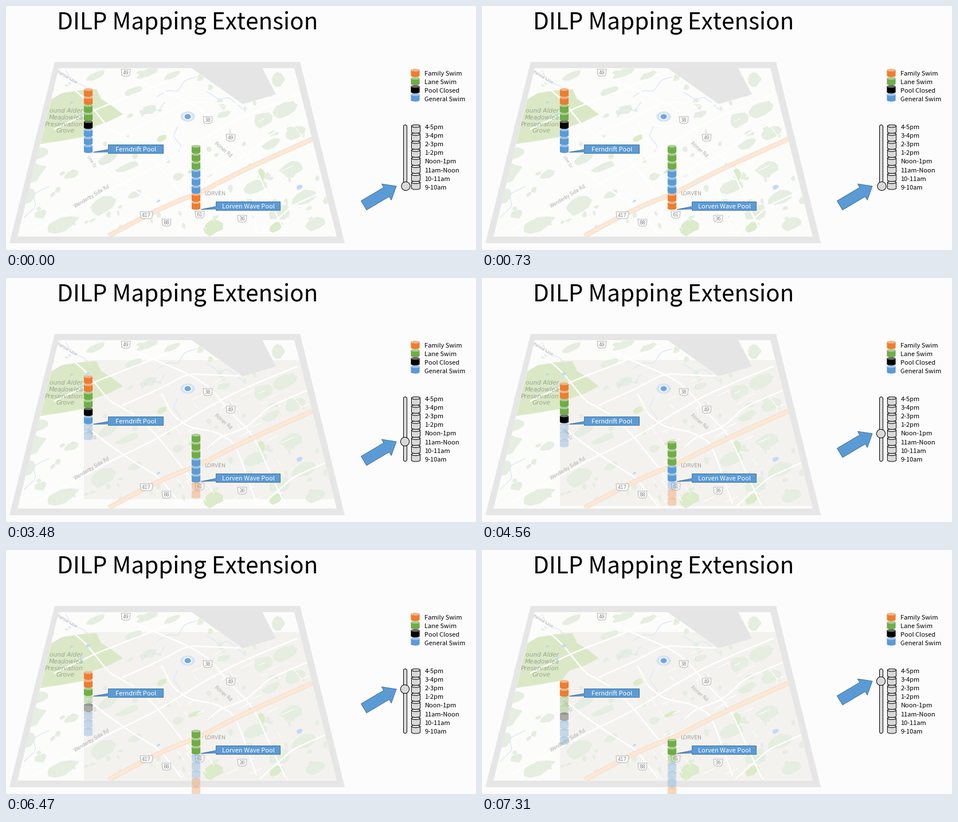
These frames come from a looping animation (820x428 px, 8000 ms). A matplotlib script:

```python
import numpy as np
import matplotlib.pyplot as plt
from matplotlib.animation import FuncAnimation
from matplotlib.collections import LineCollection, PolyCollection
from matplotlib.colors import to_rgb
from matplotlib.patches import Circle, Ellipse, FancyBboxPatch, Polygon

W, H, DPI = 820, 428, 64
STEP, LOOP = 40, 8000
SANS, MAP_FONT = "Noto Sans CJK JP", "DejaVu Sans"
ORANGE, GREEN, BLACK, BLUE = "#ed7d31", "#70ad47", "#000000", "#5b9bd5"
EDGE, GREY = "#41719c", "#d9d9d9"

CHANGES = (2290, 3480, 4560, 5400, 6470, 7310)
STACK_DROP = (0, 14, 29.5, 42, 56, 71.5, 87)
KNOB_Y = (316, 302, 287, 273, 258.5, 244, 230)
TINT_END = (144, 372, 388, 400, 404, 404, 404)

fig = plt.figure(figsize=(W / DPI, H / DPI), dpi=DPI, facecolor="#fcfcfc")
ax = fig.add_axes([0, 0, 1, 1])
ax.set_xlim(0, W)
ax.set_ylim(H, 0)
ax.axis("off")
rng = np.random.default_rng(7)


def px(size):
    return size * 72 / DPI


def add_poly(points, color, z, edge="none", lw=0.0):
    return ax.add_patch(Polygon(points, fc=color, ec=edge, lw=px(lw), zorder=z))


def write(x, y, text, size, color="black", z=6, font=SANS, **kw):
    return ax.text(x, y, text, fontsize=px(size), color=color, zorder=z,
                   family=font, **kw)


def lighter(color, amount=0.42):
    c = np.array(to_rgb(color))
    return tuple(c + (1 - c) * amount)


# --- map -------------------------------------------------------------------
add_poly([(85, 98), (513, 98), (591, 416), (6, 416)], "#e6e6e6", 1)
INNER = [(92, 109), (503, 109), (577, 404.5), (20, 404.5)]
board = add_poly(INNER, "#fcfcfb", 1.1)
tint = add_poly([(136, 144)] * 4, "#f4f2ef", 1.2)


def on_map(artist):
    ax.add_artist(artist)
    artist.set_clip_path(board)
    return artist


def blob(cx, cy, w, h, n=9):
    """Ragged patch leaning along the street grid."""
    a = np.linspace(0, 2 * np.pi, n, endpoint=False)
    r = rng.uniform(0.72, 1.12, n)
    x, y = w / 2 * r * np.cos(a), h / 2 * r * np.sin(a)
    return np.column_stack([cx + x + 0.25 * y, cy + y - 0.4 * x])


def smooth(points, n=40):
    """Rounded path through a few points."""
    p = np.array(points, float)
    t = np.arange(len(p))
    s = np.linspace(0, t[-1], n)
    xy = np.column_stack([np.interp(s, t, p[:, k]) for k in (0, 1)])
    pad = np.pad(xy, ((2, 2), (0, 0)), mode="edge")
    return sum(pad[k:k + n] for k in range(5)) / 5


woods = [
    (45, 292, 46, 34), (60, 258, 34, 18), (38, 335, 30, 26), (95, 384, 62, 30),
    (168, 350, 46, 32), (176, 268, 40, 16), (212, 282, 42, 14),
    (158, 122, 36, 12), (246, 118, 40, 14), (290, 122, 28, 12),
    (222, 150, 32, 14), (250, 182, 30, 16), (380, 190, 24, 12),
    (448, 200, 36, 28), (486, 182, 44, 24), (505, 222, 40, 22),
    (462, 242, 32, 16), (474, 128, 22, 28), (435, 318, 44, 22),
    (498, 285, 42, 26), (520, 335, 46, 24), (478, 362, 38, 28),
    (540, 382, 40, 22), (300, 300, 20, 14), (226, 330, 26, 12),
    (420, 345, 26, 14), (60, 365, 26, 16), (115, 295, 30, 14)]
specks = [(rng.uniform(40, 560), rng.uniform(115, 400), *rng.uniform(4, 13, 2))
          for _ in range(80)]
on_map(PolyCollection([blob(*w) for w in woods + specks],
                      facecolors="#e5eee0", edgecolors="none", zorder=1.3))
bright = [(362, 388, 34, 26), (470, 388, 28, 16), (272, 232, 18, 12),
          (330, 288, 30, 8), (445, 296, 14, 22)]
on_map(PolyCollection([blob(*b) for b in bright],
                      facecolors="#dcebca", edgecolors="none", zorder=1.3))
forest = [(60, 242), (70, 200), (79, 164), (97, 153), (128, 148), (158, 146),
          (166, 163), (186, 176), (204, 190), (178, 203), (152, 212),
          (139, 229), (100, 236)]
on_map(Polygon(forest, fc="#dbe8c6", ec="none", zorder=1.35))
on_map(Polygon([(324, 109), (447, 109), (471, 155), (413, 172)],
               fc="#e5e5e5", ec="none", zorder=1.35))

roads = [
    [(80, 218), (160, 180), (250, 145), (330, 112)],
    [(190, 109), (250, 140), (318, 168), (354, 190), (394, 238), (432, 276),
     (460, 340), (490, 404)],
    [(136, 256), (170, 285), (222, 322), (268, 350), (310, 404)],
    [(40, 400), (120, 356), (185, 320), (262, 283), (330, 240), (400, 200),
     (520, 150)],
    [(270, 200), (290, 240), (320, 262), (366, 270), (400, 290), (440, 404)],
    [(200, 225), (260, 198), (318, 168), (413, 172)],
    [(225, 240), (262, 275), (290, 310), (338, 370)],
    [(440, 404), (500, 350), (566, 320)],
    [(350, 300), (372, 280), (420, 262), (460, 225), (530, 195)],
    [(100, 130), (140, 165), (180, 215), (225, 240)]]
on_map(LineCollection([smooth(r) for r in roads], colors="#ffffff",
                      linewidths=px(2.6), zorder=1.5))
lanes = []
for _ in range(45):
    x, y, d = rng.uniform(230, 520), rng.uniform(180, 395), rng.uniform(8, 24)
    sx, sy = (1, -0.48) if rng.random() < 0.5 else (0.6, 0.8)
    lanes.append([(x, y), (x + d * sx, y + d * sy)])
on_map(LineCollection(lanes, colors="#ffffff", linewidths=px(1.2), zorder=1.45))
streams = [
    [(104, 112), (114, 132), (136, 140), (152, 158)],
    [(262, 160), (282, 148), (300, 150), (312, 130), (334, 124)],
    [(236, 196), (248, 178), (266, 184), (278, 168)],
    [(350, 150), (372, 164), (388, 160), (420, 186)],
    [(300, 210), (292, 228), (306, 246), (298, 262)],
    [(30, 372), (52, 352), (48, 330), (76, 316)]]
on_map(LineCollection([smooth(s) for s in streams], colors="#d9e8f8",
                      linewidths=px(1.3), zorder=1.45))
ponds = [(131, 191, 8, 5), (143, 168, 8, 6), (114, 169, 7, 4),
         (512, 318, 13, 8), (266, 342, 7, 4), (96, 200, 5, 3)]
on_map(PolyCollection([blob(*p) for p in ponds], facecolors="#c0daf6",
                      edgecolors="none", zorder=1.5))
highway = smooth([(172, 407), (238, 371), (292, 345), (342, 326), (384, 303),
                  (440, 276), (500, 249), (540, 231)])
for color, width in (("#f8dfc8", 8.5), ("#fce8d6", 6)):
    on_map(LineCollection([highway], colors=color, linewidths=px(width),
                          zorder=1.6))

for x, y, text in ((76, 187, "ound Alder"), (75, 199, "Meadowlea"),
                   (68, 211, "Preservation"), (88, 222, "Grove")):
    write(x, y, text, 10.6, "#98a78e", 1.8, MAP_FONT, style="italic")
for x, y, text, angle, size in (
        (150, 334, "Wenderby Side Rd", 31, 7.6), (379, 252, "Pilmer Rd", -40, 7.6),
        (107, 125, "Fallow Line", -30, 7), (149, 273, "Ulm Cr", -58, 7)):
    write(x, y, text, size, "#adadad", 1.8, MAP_FONT, rotation=angle,
          ha="center", va="center")
write(346, 332, "LORVEN", 9.2, "#a3a3a3", 1.8, MAP_FONT)

for x, y, text in ((209, 117, "49"), (352, 200, "38"), (392, 231, "49"),
                   (245, 367, "417"), (338, 366, "61"), (280, 380, "88"),
                   (412, 373, "36")):
    w = 11 if len(text) == 3 else 8
    add_poly([(x - w, y - 6), (x + w, y - 6), (x + w - 1, y + 4), (x + w - 4, y + 6),
              (x - w + 4, y + 6), (x - w + 1, y + 4)], "#fbfbfb", 1.8, "#b5b5b5", 1)
    write(x, y + 3.2, text, 8.4, "#8c8c8c", 1.9, MAP_FONT, ha="center")

for w, h, color in ((25, 18, "#d3e3f8"), (16, 13, "#f6faff"), (11, 9, "#6fa5ea")):
    ax.add_patch(Ellipse((317, 194), w, h, fc=color, ec="none", zorder=1.9))


# --- cylinders -------------------------------------------------------------
class Can:
    def __init__(self, x, y, color, z, rx=7.6, h=13, edge="none", lid=None):
        a = np.linspace(0, np.pi, 16)
        curve = np.column_stack([rx * np.cos(a), 2.2 * np.sin(a)])
        self.body_shape = np.vstack([curve * (1, -1) + (0, 2.2),
                                     curve[::-1] + (0, h - 0.5)])
        full = np.vstack([curve, -curve])
        self.lid_shape = full + (0, 2.2)
        lw = 1 if edge != "none" else 0
        self.body = add_poly(self.body_shape, color, z, edge, lw)
        self.lid = add_poly(self.lid_shape, lid or lighter(color), z + 0.001,
                            edge, lw)
        self.x = x
        self.place(y)

    def place(self, y, alpha=1):
        for part, shape in ((self.body, self.body_shape), (self.lid, self.lid_shape)):
            part.set_xy(shape + (self.x, y))
            part.set_alpha(alpha)


def stack(x, top, colors):
    n = len(colors)
    return [Can(x, top + 14.1 * k, c, 3 + 0.01 * (n - k))
            for k, c in enumerate(colors)]


west = stack(143.5, 144.5, [ORANGE] * 2 + [GREEN] * 2 + [BLACK] + [BLUE] * 3)
east = stack(331.5, 244, [GREEN] * 3 + [BLUE] * 3 + [ORANGE] * 2)


def callout(x0, y0, x1, y1, tip, text):
    h = y1 - y0
    add_poly([(x0, y0), (x1, y0), (x1, y1), (x0, y1), (x0, y0 + h * 0.83), tip,
              (x0, y0 + h * 0.55)], BLUE, 4, EDGE, 1)
    write((x0 + x1) / 2, (y0 + y1) / 2 + 4, text, 11, "white", ha="center")


callout(178.5, 243.5, 274.5, 258.5, (152, 256.5), "Ferndrift Pool")
callout(366.5, 343.5, 478.5, 358.5, (340, 357), "Lorven Wave Pool")

# --- title and legends -----------------------------------------------------
write(89, 40, "DILP Mapping Extension", 40.4)
keys = (("Family Swim", ORANGE), ("Lane Swim", GREEN),
        ("Pool Closed", BLACK), ("General Swim", BLUE))
for k, (text, color) in enumerate(keys):
    Can(714, 110.5 + 14.3 * k, color, 3 - 0.01 * k, h=12.5)
    write(730.5, 122.3 + 14.9 * k, text, 11)

hours = ("4-5pm", "3-4pm", "2-3pm", "1-2pm", "Noon-1pm", "11am-Noon",
         "10-11am", "9-10am")
for k, text in enumerate(hours):
    Can(715, 208.5 + 14.1 * k, GREY, 3 - 0.01 * k, h=13, edge="black", lid="#e2e2e2")
    write(730.5, 216 + 15.1 * k, text, 11)

ax.add_patch(FancyBboxPatch((693.5, 208.5), 6, 113, fc=GREY, ec="black", lw=px(1),
                            boxstyle="round,pad=0,rounding_size=3", zorder=3))
knob = ax.add_patch(Circle((696, 316), 7.6, fc=GREY, ec="black", lw=px(1), zorder=4))

# Block arrow with its tip at the origin
along = np.array([57, -34]) / np.hypot(57, 34)
across = np.array([-along[1], along[0]])
ARROW = np.array([u * along + v * across for u, v in (
    (0, 0), (-20, 16.5), (-20, 9.3), (-66, 9.3), (-66, -9.3), (-20, -9.3),
    (-20, -16.5))])
arrow = add_poly(ARROW, BLUE, 4, EDGE, 1)


def right_edge(y):
    return np.interp(y, (109, 404.5), (503, 577))


def update(i):
    # A change belongs to the step during which it happens
    stage = sum(i >= t // STEP for t in CHANGES)
    drop = STACK_DROP[stage]
    for cans, top, shift in ((west, 144.5, 3 if stage else 0), (east, 244, 0)):
        for k, can in enumerate(cans):
            gone = k >= len(cans) - stage
            can.place(top + 14.1 * k + drop - shift, 0.3 if gone else 1)
    y = KNOB_Y[stage]
    knob.center = (696 if stage else 697.5, y)
    arrow.set_xy(ARROW + (681, y))
    end = TINT_END[stage]
    tint.set_xy([(136, 144), (right_edge(144), 144), (right_edge(end), end),
                 (136, end)])
    return ()


anim = FuncAnimation(fig, update, frames=LOOP // STEP, interval=STEP,
                     repeat=True, repeat_delay=0, init_func=lambda: update(0))
plt.show()
```
